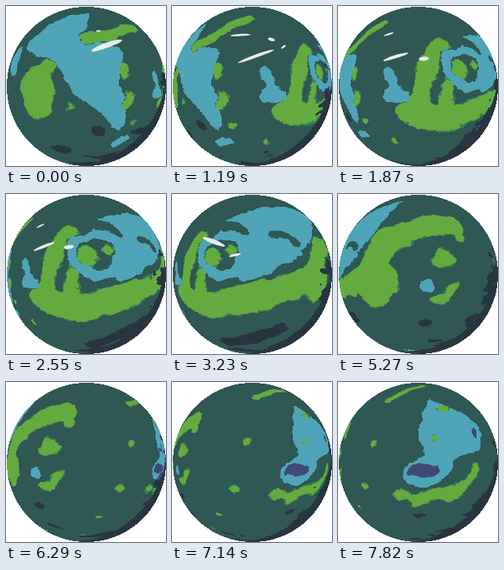
These frames come from a looping animation (200 px wide and 200 px high, 7990 ms). An HTML page with a canvas:

```html
<!DOCTYPE html>
<html lang="en">
<head>
<meta charset="utf-8">
<title>Turning planet</title>
<style>
  html, body { margin: 0; width: 100%; height: 100%; overflow: hidden; background: #fff; }
  canvas { display: block; width: 100vw; height: 100vh; image-rendering: pixelated; }
</style>
</head>
<body>
<canvas id="planet" width="200" height="200"></canvas>
<script>
const SIZE = 200, CENTER = 100.5, R = 99.5;
const STEP_MS = 170, STEPS = 47;
const GROUND_SPEED = 0.07, CLOUD_SPEED = 0.038;
const MAP_W = 1080, MAP_H = 400, SCALE = 200;
const LIGHT = 78, NIGHT = 122;

const rgb = hex => [16, 8, 0].map(s => parseInt(hex, 16) >> s & 255);
const [GRASS, RIM, LAND, DARK, WATER, DEEP] =
  ['63ab3f', '3b7d4f', '2f5753', '283540', '4fa4b8', '404973'].map(rgb);

// The ground is a flat strip, u to the east and v to the south, wrapped on a ball.
function flatten(x, y) {
  const a = (x - CENTER) / R, b = (y - CENTER) / R;
  const z = Math.sqrt(Math.max(0, 1 - a * a - b * b));
  return [a / (1 + z), b / (1 + z)];
}
function bulge(u, v) {
  const k = 2 * R / (1 + u * u + v * v);
  return [CENTER + u * k, CENTER + v * k];
}

// Layered value noise.
function hash(x, y) {
  const n = Math.sin(x * 12.9898 + y * 78.233) * 15731.743;
  return n - Math.floor(n);
}
function valueNoise(x, y) {
  const i = Math.floor(x), j = Math.floor(y);
  const ease = t => t * t * (3 - 2 * t), mix = (a, b, t) => a + (b - a) * t;
  const fx = ease(x - i), fy = ease(y - j);
  return mix(mix(hash(i, j), hash(i + 1, j), fx), mix(hash(i, j + 1), hash(i + 1, j + 1), fx), fy);
}
function fbm(x, y, octaves) {
  let sum = 0, gain = 0.5;
  for (let o = 0; o < octaves; o++, gain /= 2) sum += gain * (valueNoise(x * 2 ** o + o * 17, y * 2 ** o) - 0.5);
  return sum;
}

// The sketch of the strip keeps grass in red, water in green and darkness in blue.
const sketch = document.createElement('canvas');
sketch.width = MAP_W;
sketch.height = MAP_H;
const map = sketch.getContext('2d', { willReadFrequently: true });
map.fillStyle = '#000';
map.fillRect(0, 0, MAP_W, MAP_H);
map.filter = 'blur(3px)';
map.setTransform(SCALE, 0, 0, SCALE, SCALE, SCALE);
map.lineCap = map.lineJoin = 'round';

const ink = { grass: '#f00', water: '#0f0', land: '#000', dark: '#00f', deep: '#0ff' };
function blob(kind, u, v, ru, rv = ru, tilt = 0) {
  map.fillStyle = ink[kind];
  map.beginPath();
  map.ellipse(u, v, ru, rv, tilt, 0, 2 * Math.PI);
  map.fill();
}
function path(...points) {
  map.beginPath();
  points.forEach(p => map.lineTo(...p));
}
function ridge(kind, width, ...points) {
  map.strokeStyle = ink[kind];
  map.lineWidth = width;
  path(...points);
  map.stroke();
}
function area(kind, ...points) {
  map.fillStyle = ink[kind];
  path(...points);
  map.fill();
}

// Western ocean and its shores
area('water', [-0.56, -0.34], [-0.28, -0.58], [0.04, -0.66], [-0.03, -0.33], [0.28, -0.24], [0.22, -0.05],
  [0.29, 0.17], [0.28, 0.35], [0, 0.1], [-0.15, -0.05], [-0.23, -0.18]);
blob('water', -0.68, -0.23, 0.1, 0.15);
blob('grass', -0.36, 0.04, 0.16, 0.19);
ridge('grass', 0.1, [-0.36, -0.02], [-0.25, -0.13]);
ridge('grass', 0.1, [0, -0.33], [0.16, -0.37], [0.45, -0.56]);
blob('grass', 0.27, -0.11, 0.045, 0.06);
blob('grass', 0.29, 0.1, 0.04, 0.07);
blob('grass', 0.36, 0.28, 0.03);
blob('grass', -0.1, 0.13, 0.015, 0.04);
blob('dark', 0.09, 0.31, 0.065, 0.045);
blob('dark', -0.2, 0.51, 0.1, 0.06);

// Lake country
ridge('water', 0.08, [0.59, -0.09], [0.6, 0.05], [0.75, 0.09]);
ridge('water', 0.06, [0.2, 0.46], [0.33, 0.41]);
ridge('grass', 0.08, [0.69, 0.15], [0.79, 0.22]);
blob('grass', 0.59, 0.41, 0.04, 0.02);

// Long grass belt, ring sea and eastern ocean
area('water', [1.28, 0.06], [1.22, -0.1], [1.3, -0.32], [1.1, -0.4], [1.6, -0.62], [2.05, -0.7], [1.9, -0.45],
  [1.84, -0.3], [1.68, -0.15], [1.5, -0.03]);
ridge('land', 0.06, [1.45, -0.26], [1.6, -0.27], [1.68, -0.23]);
ridge('grass', 0.18, [0.74, 0.17], [0.94, 0.23], [1.18, 0.2], [1.4, 0.14], [1.61, 0.1], [1.8, -0.02], [1.93, -0.25]);
ridge('grass', 0.12, [0.93, -0.28], [0.83, -0.15], [0.81, 0.02], [0.8, 0.15]);
ridge('grass', 0.06, [0.96, -0.08], [0.96, 0.18]);
map.beginPath();
map.strokeStyle = ink.water;
map.lineWidth = 0.08;
map.ellipse(1.13, -0.14, 0.16, 0.14, 0, 0, 2 * Math.PI);
map.stroke();
blob('grass', 1.06, -0.12, 0.055, 0.065);
blob('grass', 1.2, -0.16, 0.04, 0.025);
ridge('dark', 0.12, [1.1, 0.6], [1.35, 0.5], [1.55, 0.4]);

// Hooked continent
blob('grass', 1.86, 0.06, 0.17, 0.18);
ridge('grass', 0.17, [1.9, -0.1], [1.98, -0.22], [2.17, -0.34], [2.42, -0.38]);
ridge('grass', 0.08, [2.42, -0.38], [2.48, -0.26]);
blob('grass', 2.34, -0.1, 0.08, 0.065);
ridge('grass', 0.06, [2.26, 0.175], [2.36, 0.16], [2.41, 0.08]);
blob('water', 2.21, 0.076, 0.055, 0.035);
blob('water', 2.09, 0.73, 0.1, 0.02);
blob('dark', 2.215, 0.34, 0.05, 0.035);
blob('dark', 2.33, 0.56, 0.09, 0.025);

// Plains with a few meadows
for (const [u, v] of [[2.82, 0.18], [2.91, -0.13], [2.68, 0.41], [2.55, 0.65]]) blob('grass', u, v, 0.03, 0.025);

// Far sea with its deep basin
area('water', [3.2, -0.19], [3.3, -0.5], [3.45, -0.45], [3.75, -0.3], [3.7, -0.12], [3.5, -0.05],
  [3.44, 0.08], [3.3, 0.17], [3.12, 0.14], [3.12, 0.06], [3.27, -0.06]);
blob('deep', 3.245, 0.06, 0.115, 0.045, -0.2);
blob('deep', 3.67, -0.22, 0.035, 0.05);
blob('grass', 3.34, -0.165, 0.025, 0.03);
blob('grass', 3.41, -0.41, 0.07, 0.035);
ridge('grass', 0.06, [2.97, -0.52], [3.26, -0.75]);
blob('grass', 3.09, 0.22, 0.06, 0.045);
ridge('grass', 0.09, [3.19, 0.25], [3.35, 0.22], [3.5, 0.22], [3.65, 0.05]);
blob('dark', 3.22, 0.385, 0.05, 0.03);

// Noise bends the sketch and frays its edges.
const pixels = map.getImageData(0, 0, MAP_W, MAP_H).data;
const ground = new Float32Array(MAP_W * MAP_H * 4);
const clamp = (n, max) => Math.min(max, Math.max(0, Math.round(n)));
for (let y = 0; y < MAP_H; y++)
  for (let x = 0; x < MAP_W; x++) {
    const sx = clamp(x + 20 * fbm(x / 24, y / 18, 3), MAP_W - 1);
    const sy = clamp(y + 16 * fbm(x / 24 + 90, y / 18 + 50, 3), MAP_H - 1);
    const from = (sy * MAP_W + sx) * 4, to = (y * MAP_W + x) * 4;
    const fray = 0.5 * fbm(x / 8, y / 5, 2);
    for (let c = 0; c < 3; c++) ground[to + c] = pixels[from + c] / 255 + fray;
    ground[to + 3] = fbm(x / 40, y / 16, 3);
  }

const disc = [];
for (let y = 0; y < SIZE; y++)
  for (let x = 0; x < SIZE; x++)
    if (Math.hypot(x + 0.5 - CENTER, y + 0.5 - CENTER) < R) {
      const [u, v] = flatten(x + 0.5, y + 0.5);
      disc.push({ at: (y * SIZE + x) * 4, u, row: Math.floor((v + 1) * SCALE), light: Math.hypot(x - LIGHT, y - LIGHT) });
    }

function surface(i, light) {
  const [grass, water, dark, height] = ground.subarray(i, i + 4);
  const shade = Math.max(0, light - 90) * 0.012;
  const unlit = light > NIGHT || dark > 0.5 || light + height * 45 > NIGHT;
  if (water > 0.5) return unlit ? DEEP : WATER;
  if (unlit) return DARK;
  if (grass > 0.5 + shade) return GRASS;
  return grass > 0.34 + shade * 0.4 ? RIM : LAND;
}

// Each cloud is a thin ellipse drifting between its first and last step.
const clouds = [];
function flock(first, last, seen, ...streaks) {
  for (const [u, v, length, width, tilt] of streaks)
    clouds.push({ first, last, u: u + seen * CLOUD_SPEED, v, length, width, tilt });
}
flock(0, 3, 0, [0.15, -0.29, 0.13, 0.02, -0.45], [0.09, -0.41, 0.02, 0.008, -0.2]);
flock(4, 10, 7, [-0.086, -0.37, 0.075, 0.01, 0], [0.135, -0.333, 0.025, 0.015, 0.2],
  [0.026, -0.2, 0.13, 0.011, -0.38], [0.22, -0.28, 0.025, 0.007, -0.7]);
flock(11, 18, 15, [-0.306, -0.198, 0.09, 0.012, -0.25], [-0.116, -0.18, 0.033, 0.014, -0.1],
  [-0.377, -0.396, 0.04, 0.01, -0.2]);
flock(19, 26, 23, [-0.436, -0.237, 0.11, 0.016, 0.45], [-0.266, -0.125, 0.04, 0.009, -0.2]);

const ctx = document.getElementById('planet').getContext('2d');
const image = ctx.createImageData(SIZE, SIZE);

function drawCloud({ u, v, length, width, tilt }, drift) {
  ctx.beginPath();
  for (let a = 0; a < 2 * Math.PI; a += 0.2) {
    const p = length * Math.cos(a), q = width * Math.sin(a);
    ctx.lineTo(...bulge(u - drift + p * Math.cos(tilt) - q * Math.sin(tilt),
      v + p * Math.sin(tilt) + q * Math.cos(tilt)));
  }
  ctx.fill();
}

function render(step) {
  const turn = step * GROUND_SPEED + 1;
  for (const { at, u, row, light } of disc) {
    const column = clamp((u + turn) * SCALE, MAP_W - 1);
    image.data.set(surface((row * MAP_W + column) * 4, light), at);
    image.data[at + 3] = 255;
  }
  ctx.putImageData(image, 0, 0);
  ctx.fillStyle = '#e9efe8';
  for (const cloud of clouds)
    if (step >= cloud.first && step <= cloud.last) drawCloud(cloud, step * CLOUD_SPEED);
}

const start = performance.now();
let shown = -1;
function tick() {
  const step = Math.floor((performance.now() - start) / STEP_MS) % STEPS;
  if (step !== shown) render(shown = step);
  requestAnimationFrame(tick);
}
tick();
</script>
</body>
</html>
```
